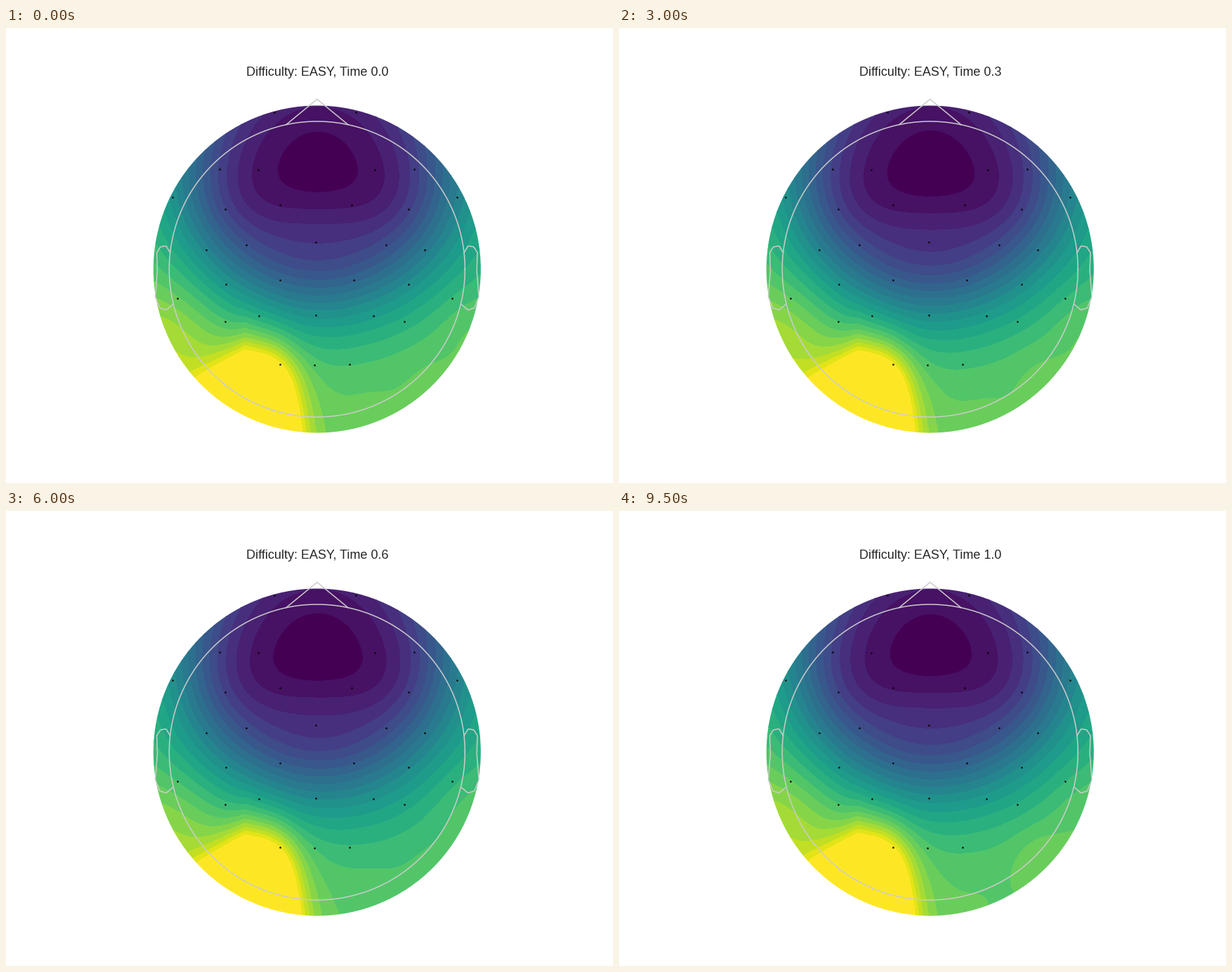
Recreate the animation shown at these times as a matplotlib script. Size 864 by 648 pixels, loop 10 s.

```python
import numpy as np
import matplotlib.pyplot as plt
from matplotlib.animation import FuncAnimation
from matplotlib.patches import Circle

W, H, DPI = 864, 648, 108
STEP_MS, LOOP_MS = 50, 10000
CX, CY = 442.8, 343.5
HEAD_R, MAP_R = 210.5, 233
BANDS = 23
LINE = "#cccccc"

# Sensor pairs as (left x, right x, y), then the midline as (x, y)
PAIRS = [
    (382, 498, 120), (304, 581, 201), (359, 524.5, 202), (237, 641.5, 241),
    (311.5, 572.5, 257.5), (390, 492, 252), (285, 595.5, 316),
    (342, 540.5, 308.5), (313, 572.5, 365), (389.5, 494.5, 359),
    (244, 634.5, 385), (312, 567, 417.5), (360, 523, 410), (390, 489, 479),
]
MIDLINE = [(441, 304.5), (440.5, 408.5), (439, 479.5)]

span = np.linspace(-MAP_R - 2, MAP_R + 2, 200)
gx, gy = np.meshgrid(CX + span, CY + span)


def sigmoid(z):
    return 1 / (1 + np.exp(-z))


def bump(x, y, rx, ry=None):
    """Gaussian hill of height 1 on the map."""
    return np.exp(-((gx - x) / rx) ** 2 / 2 - ((gy - y) / (ry or rx)) ** 2 / 2)


def pulse(t, centre, width):
    return np.exp(-((t - centre) / width) ** 2)


def resting_field():
    """Potential in colour bands: a frontal trough and a left occipital peak."""
    dx = gx - CX
    trough = 17.3 * sigmoid((np.hypot(dx, gy - 198) - 182) / 47)
    trough *= 1 - 0.045 * np.tanh(dx / 120)
    trough += 1.2 * bump(CX, 285, 60, 30)
    for side in (-1, 1):
        trough -= 0.6 * bump(CX + 115 * side, 245, 45)

    right_edge = 402 + 0.1 * (gy - 479)
    top_edge = 466 + 0.85 * np.maximum(0, 340 - gx)
    peak = 14 * sigmoid((right_edge - gx) / 15) * sigmoid((gy - top_edge) / 22)
    peak += 2.6 * bump(225, 450, 60)
    return trough + peak


base = resting_field()
occipital = bump(565, 490, 100)
spot = bump(603, 495, 30)
temporal = bump(225, 400, 80)
central = bump(CX, 350, 90)
base += (0.6 * occipital + 0.35 * spot + 0.15 * bump(515, 530, 28)
         + 0.9 * bump(665, 425, 40))


def field_at(t):
    """Potential after t seconds."""
    dip = -1.2 * pulse(t, 6, 2)
    swell = 1.2 * pulse(t, 1.5, 1.1) - 0.7 * pulse(t, 6.3, 2.2)
    return (base + swell * occipital + dip * temporal
            + (0.1 * t + 0.6 * dip) * spot
            - 0.55 * np.sin(np.pi * t / 10) * central)


def held_time(ms):
    """The map moves briefly at each half second and then rests."""
    if ms < 500:
        return 0
    return min(ms // 500 * 500 + min(ms % 500, 150), 9500)


fig = plt.figure(figsize=(W / DPI, H / DPI), dpi=DPI, facecolor="white")
ax = fig.add_axes([0, 0, 1, 1])
ax.set_xlim(0, W)
ax.set_ylim(H, 0)
ax.axis("off")
disc = Circle((CX, CY), MAP_R, transform=ax.transData)
colors = plt.get_cmap("viridis")(np.linspace(0, 1, BANDS))


def outline(x, y):
    """Draw a line given in head radii around the head centre."""
    ax.plot(CX + HEAD_R * np.asarray(x), CY - HEAD_R * np.asarray(y),
            color=LINE, lw=1, zorder=3)


turn = np.linspace(0, 2 * np.pi, 201)
outline(np.cos(turn), np.sin(turn))
nose = np.radians(12)
outline([-nose, 0, nose], [np.sqrt(1 - nose ** 2), 1.15, np.sqrt(1 - nose ** 2)])
ear_x = 2 * np.array([.497, .510, .518, .530, .542, .540, .547, .532, .510, .489])
ear_y = 2 * np.array([.056, .078, .078, .075, .056, -.006, -.093, -.131, -.138, -.120])
outline(ear_x, ear_y)
outline(-ear_x, ear_y)

sensors = MIDLINE + [(x, y) for left, right, y in PAIRS for x in (left, right)]
ax.plot(*zip(*sensors), "o", color="black", ms=1.7, mew=0, zorder=4)
title = ax.text(CX, 68.2, "", ha="center", va="baseline", fontsize=12,
                family="Liberation Sans", color="#262626")

shown = {"time": None, "map": None}


def draw_map(ms):
    if shown["map"] is not None:
        shown["map"].remove()
    shown["map"] = ax.contourf(gx, gy, field_at(ms / 1000), colors=colors,
                               levels=np.arange(1, BANDS), extend="both", zorder=1)
    shown["map"].set_clip_path(disc)
    shown["time"] = ms


def update(frame):
    ms = frame * STEP_MS
    if held_time(ms) != shown["time"]:
        draw_map(held_time(ms))
    title.set_text(f"Difficulty: EASY, Time {(ms + 500) // 1000 / 10:.1f}")
    return [title]


anim = FuncAnimation(fig, update, frames=LOOP_MS // STEP_MS, interval=STEP_MS,
                     repeat=True, repeat_delay=0, blit=False)
plt.show()
```
